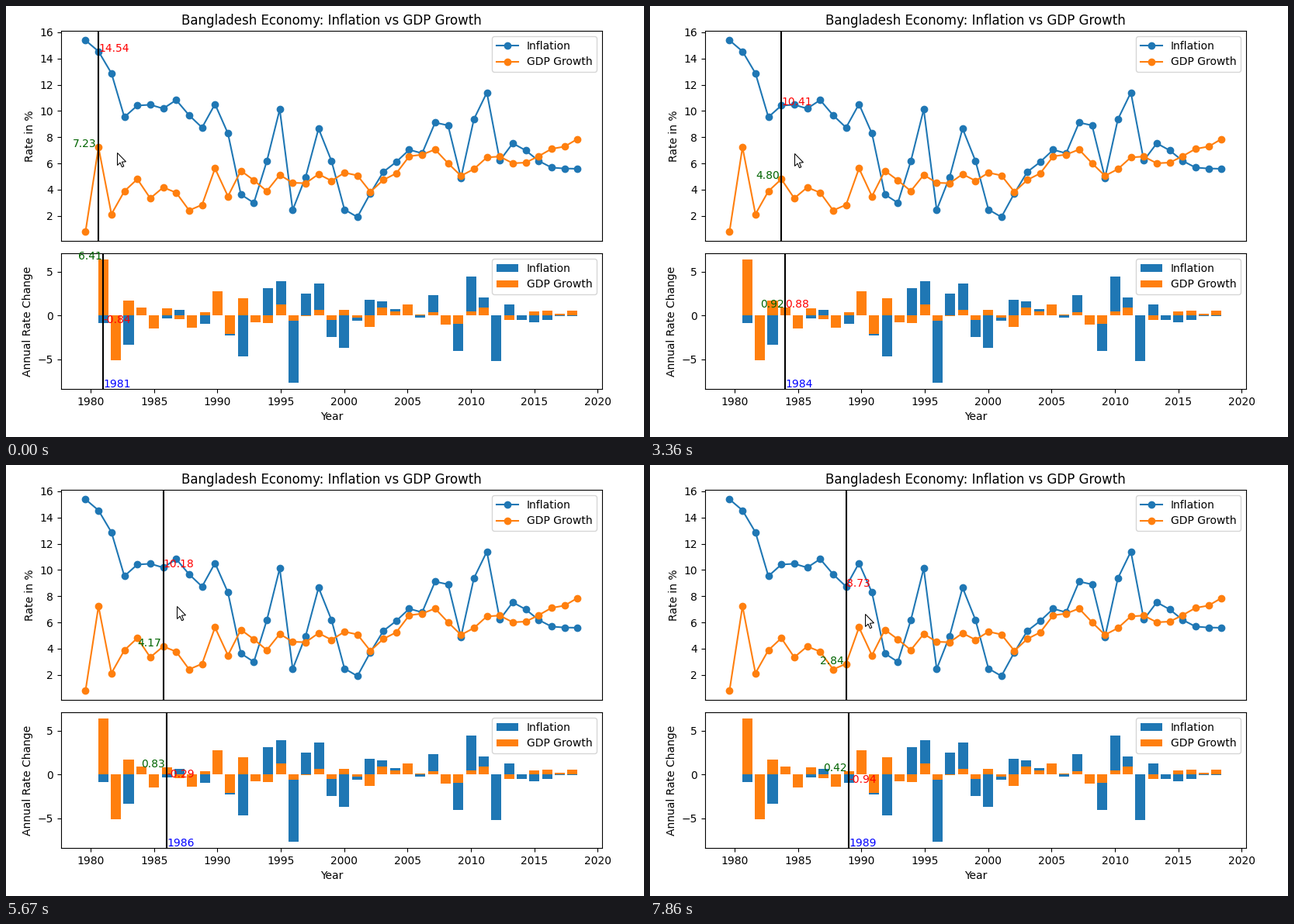
A matplotlib script for the animation above (8000 ms loop, 822 px wide and 556 px high).

```python
import numpy as np
import matplotlib.pyplot as plt
from matplotlib.animation import FuncAnimation
from matplotlib.patches import Polygon

W, H, DPI = 822, 556, 100
LOOP, TICK = 8000, 50

YEARS = np.arange(1980, 2019)
INFLATION = np.array([
    15.38, 14.54, 12.87, 9.53, 10.41, 10.47, 10.18, 10.83, 9.67, 8.73,
    10.52, 8.28, 3.63, 2.99, 6.16, 10.12, 2.45, 4.96, 8.65, 6.18,
    2.48, 1.91, 3.72, 5.35, 6.11, 7.04, 6.77, 9.11, 8.90, 4.90,
    9.37, 11.40, 6.22, 7.53, 6.99, 6.19, 5.68, 5.61, 5.59])
GDP = np.array([
    0.82, 7.23, 2.13, 3.88, 4.80, 3.34, 4.17, 3.77, 2.42, 2.84,
    5.62, 3.49, 5.44, 4.71, 3.89, 5.12, 4.52, 4.49, 5.18, 4.67,
    5.29, 5.08, 3.83, 4.74, 5.24, 6.54, 6.67, 7.06, 6.01, 5.05,
    5.57, 6.46, 6.52, 6.01, 6.06, 6.55, 7.11, 7.28, 7.86])
INFLATION_CHANGE = np.diff(INFLATION, prepend=INFLATION[0])
GDP_CHANGE = np.diff(GDP, prepend=GDP[0])

# (time in ms, year selected from then on)
SELECTED = [(0, 1981), (1250, 1983), (3120, 1984), (4460, 1986),
            (5790, 1987), (7220, 1989)]

# Bursts of pointer motion: first step, last step, number of steps
BURSTS = [(0, 0, 1), (160, 570, 3), (1760, 2550, 6), (3120, 3510, 4),
          (3790, 3790, 1), (4170, 4460, 3), (4730, 5670, 7),
          (5790, 6750, 7), (6900, 7860, 7)]
STOPS = np.concatenate([np.linspace(*burst) for burst in BURSTS])

# Pointer path: time, x, y
PATH = np.array([
    (0, 143, 189), (570, 146, 193), (1600, 146, 193), (2076, 164, 189),
    (2392, 179, 189), (2550, 176, 190), (3000, 176, 190), (3510, 190, 190),
    (3790, 195, 191), (4460, 195, 191), (5043, 211, 191), (5670, 220, 182),
    (6110, 241, 194), (6750, 246, 194), (7860, 277, 192)])

ARROW = np.array([(0, 0), (0, 16), (3.6, 12.6), (6, 18.2), (8.3, 17.2),
                  (5.9, 11.7), (11, 11.3)])


def add_panel(fig, top, bottom, ylabel):
    left, right = 70.8, 768
    ax = fig.add_axes([left / W, 1 - bottom / H,
                       (right - left) / W, (bottom - top) / H])
    ax.set_ylabel(ylabel)
    return ax


class Readout:
    """Vertical marker with a value label for each series."""

    def __init__(self, ax, inflation, gdp):
        self.inflation, self.gdp = inflation, gdp
        ax.set_xlim(ax.get_xlim())
        ax.set_ylim(ax.get_ylim())
        self.line = ax.axvline(1981, color="black", lw=1.5)
        self.right = ax.text(1981, 0, "", color="red")
        self.left = ax.text(1979, 0, "", color="darkgreen")

    def show(self, year):
        i = year - YEARS[0]
        self.line.set_xdata([year, year])
        for label, x, value in ((self.right, year, self.inflation[i]),
                                (self.left, year - 2, self.gdp[i])):
            label.set_position((x, value))
            label.set_text(f"{value:.2f}")


fig = plt.figure(figsize=(W / DPI, H / DPI), dpi=DPI, facecolor="white")

rates = add_panel(fig, 32, 303, "Rate in %")
rates.set_title("Bangladesh Economy: Inflation vs GDP Growth")
rates.plot(YEARS, INFLATION, "o-", label="Inflation")
rates.plot(YEARS, GDP, "o-", label="GDP Growth")
rates.set_xticks([])
rates.legend(loc="upper right")

changes = add_panel(fig, 319, 494, "Annual Rate Change")
changes.bar(YEARS, INFLATION_CHANGE, label="Inflation")
changes.bar(YEARS, GDP_CHANGE, label="GDP Growth")
changes.set_xlabel("Year")
changes.legend(loc="upper right")

readouts = [Readout(rates, INFLATION, GDP),
            Readout(changes, INFLATION_CHANGE, GDP_CHANGE)]
year_label = changes.text(1981, -8.2, "", color="blue")

overlay = fig.add_axes([0, 0, 1, 1])
overlay.set(xlim=(0, W), ylim=(H, 0))
overlay.axis("off")
pointer = overlay.add_patch(Polygon(ARROW, facecolor="white",
                                    edgecolor="black", lw=0.75))


def update(k):
    t = (k + 1) * TICK - 1
    year = [y for start, y in SELECTED if start <= t][-1]
    for readout in readouts:
        readout.show(year)
    year_label.set_x(year)
    year_label.set_text(str(year))

    stop = STOPS[STOPS <= t][-1]
    tip = [np.interp(stop, PATH[:, 0], PATH[:, c]) for c in (1, 2)]
    pointer.set_xy(ARROW + np.round(tip) + 0.5)
    return []


anim = FuncAnimation(fig, update, frames=LOOP // TICK, interval=TICK,
                     init_func=lambda: update(0), repeat=True,
                     repeat_delay=0)
plt.show()
```
